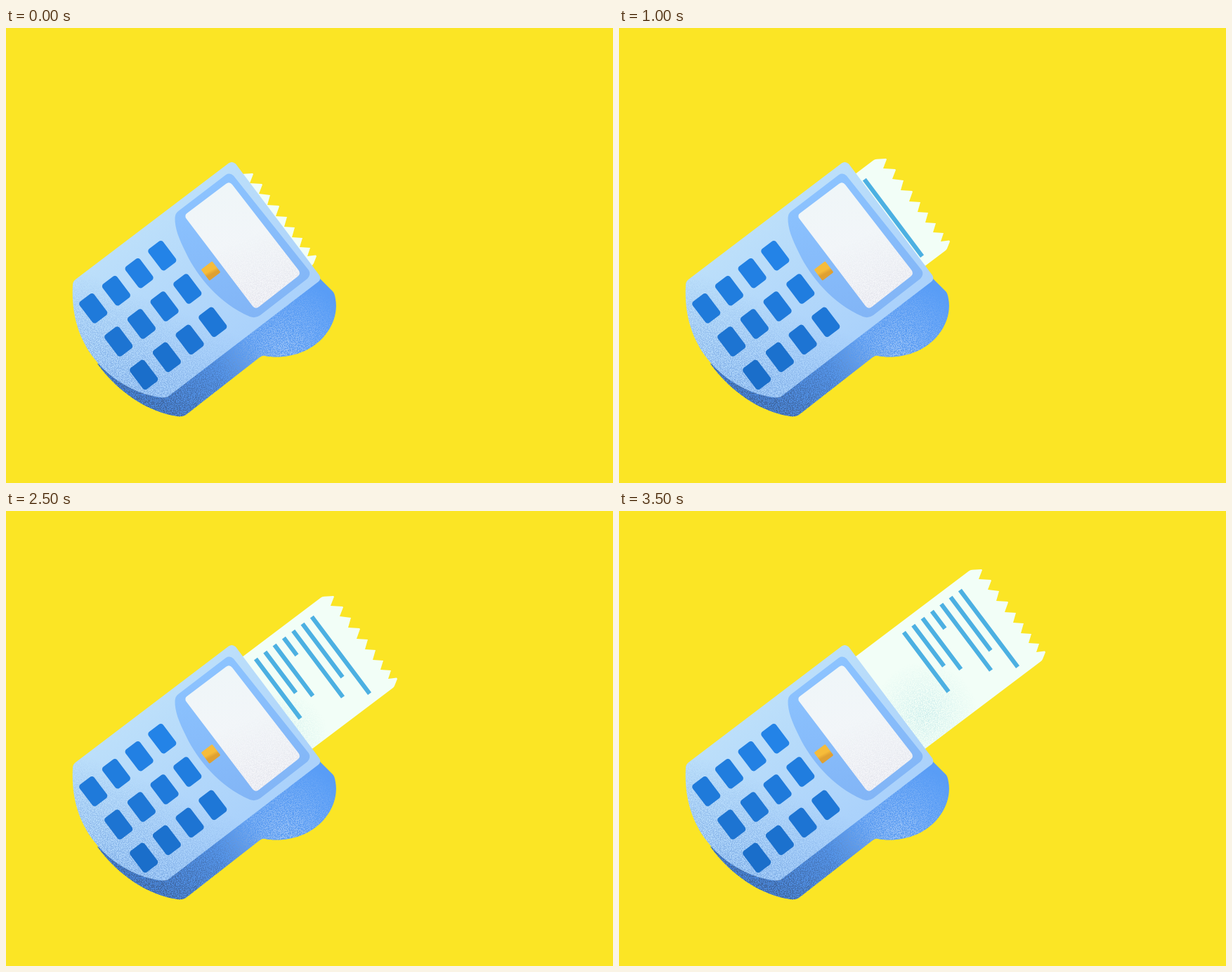
These frames come from a looping animation (864x648 px, 4 s). An HTML page:

```html
<!DOCTYPE html>
<html lang="en">
<head>
<meta charset="utf-8">
<title>Receipt printing</title>
<style>
  html, body { margin: 0; width: 100%; height: 100%; overflow: hidden; background: #fbe525; }
  svg { display: block; width: 864px; height: 648px; }
  #paper { animation: print 4s step-end infinite; }
  @keyframes print {
    0%    { transform: translate(-165px, 124px); }
    12.5% { transform: translate(-157px, 118px); }
    25%   { transform: translate(-136px, 103px); }
    37.5% { transform: translate(-110px, 83.5px); }
    50%   { transform: translate(-82px, 62px); }
    62.5% { transform: translate(-50px, 38px); }
    75%   { transform: translate(-21.5px, 16.5px); }
    87.5%, 100% { transform: translate(0, 0); }
  }
</style>
</head>
<body>
<svg viewBox="0 0 864 648">
  <defs>
    <filter id="grain" x="0" y="0" width="864" height="648" filterUnits="userSpaceOnUse" color-interpolation-filters="sRGB">
      <feTurbulence type="fractalNoise" baseFrequency=".75" numOctaves="2" seed="4"/>
      <feColorMatrix values="0 0 0 0 0  0 0 0 0 0  0 0 0 0 0  5 0 0 0 -2"/>
      <feComposite in="SourceGraphic" operator="in"/>
    </filter>
    <linearGradient id="faceFill" gradientUnits="userSpaceOnUse" x1="210" y1="275" x2="330" y2="440">
      <stop offset="0" stop-color="#bcdffa"/><stop offset="1" stop-color="#abd2fb"/>
    </linearGradient>
    <linearGradient id="sideFill" gradientUnits="userSpaceOnUse" x1="440" y1="380" x2="200" y2="545">
      <stop offset="0" stop-color="#599df6"/><stop offset=".55" stop-color="#5899ee"/><stop offset="1" stop-color="#4b8ae0"/>
    </linearGradient>
    <linearGradient id="frameFill" gradientUnits="userSpaceOnUse" x1="290" y1="220" x2="350" y2="410">
      <stop offset="0" stop-color="#8cc3ff"/><stop offset="1" stop-color="#82b5f6"/>
    </linearGradient>
    <linearGradient id="screenFill" gradientUnits="userSpaceOnUse" x1="315" y1="220" x2="360" y2="400">
      <stop offset="0" stop-color="#eff6f8"/><stop offset="1" stop-color="#f5f5f9"/>
    </linearGradient>
    <linearGradient id="buttonFill" gradientUnits="userSpaceOnUse" x1="293" y1="334" x2="289" y2="359">
      <stop offset=".45" stop-color="#f6bc3a"/><stop offset=".65" stop-color="#dfa031"/>
    </linearGradient>
    <linearGradient id="faceShade" gradientUnits="userSpaceOnUse" x1="215" y1="390" x2="165" y2="510">
      <stop offset="0" stop-color="#6d9fdf" stop-opacity="0"/><stop offset="1" stop-color="#6d9fdf" stop-opacity=".75"/>
    </linearGradient>
    <linearGradient id="sideShade" gradientUnits="userSpaceOnUse" x1="325" y1="430" x2="240" y2="555">
      <stop offset="0" stop-color="#3b5d90" stop-opacity="0"/><stop offset="1" stop-color="#3b5d90" stop-opacity=".85"/>
    </linearGradient>
    <radialGradient id="sideGlow" gradientUnits="userSpaceOnUse" cx="395" cy="455" r="100">
      <stop offset="0" stop-color="#b4d2f8" stop-opacity=".75"/><stop offset="1" stop-color="#b4d2f8" stop-opacity="0"/>
    </radialGradient>
    <linearGradient id="screenShade" gradientUnits="userSpaceOnUse" x1="335" y1="300" x2="375" y2="400">
      <stop offset="0" stop-color="#d5d7e2" stop-opacity="0"/><stop offset="1" stop-color="#d5d7e2" stop-opacity=".55"/>
    </linearGradient>
    <radialGradient id="paperShade" gradientUnits="userSpaceOnUse" cx="435" cy="290" r="75">
      <stop offset="0" stop-color="#b5e4e6" stop-opacity=".6"/><stop offset="1" stop-color="#b5e4e6" stop-opacity="0"/>
    </radialGradient>
    <path id="sheet" d="M310 227.500L498 85.500Q500 84 503 83.700L516 83L517 84L512 97L529 98L530 99L525 112L541 114L537 128L553 129L554 130L549 144L565 145L561 159L576 160L572 174L587 175L583 188L598 189L594 201L606 199.500L607 201L603 211Q602 213 600 214.500L410 358Z"/>
    <path id="side" d="M440 350L465 375Q468 378 469 386C474 412 458 445 425 460C405 469 383 470 369 467Q365 466 361 469L256 551Q252 554 244 553C205 548 160 520 130 478L230 500Z"/>
    <path id="face" d="M317 192.500Q322 189 327 193.500L446 352Q449 357 445 361L233 523Q229 527 221 526C190 523 150 503 125 470C102 440 93 405 95 366Q95 361 99 358Z"/>
    <path id="screen" d="M313 222Q318 218 322 223L416.500 345Q420 350 415 354L360 397Q355 401 351 396L257 272Q253 267 258 263.500Z"/>
  </defs>

  <rect width="864" height="648" fill="#fbe525"/>

  <g id="paper">
    <use href="#sheet" fill="#f2fef7"/>
    <use href="#sheet" fill="url(#paperShade)" filter="url(#grain)"/>
    <g id="lines" transform="matrix(.8 -.6 .6 .8 0 0)" stroke="#4cb0e2" stroke-width="6.200"/>
  </g>

  <use href="#side" fill="url(#sideFill)"/>
  <use href="#side" fill="url(#sideGlow)" filter="url(#grain)"/>
  <use href="#side" fill="url(#sideShade)" filter="url(#grain)"/>
  <use href="#face" fill="url(#faceFill)"/>
  <use href="#face" fill="url(#faceShade)" filter="url(#grain)"/>

  <path fill="url(#frameFill)" d="M313 209Q319 205.500 324 210.500L431 345Q434.500 351 429 357L362 409Q355 414 347 411C303 392 272 353 257 322C246 300 240 285 240.500 270Q241 264 245 261Z"/>
  <use href="#screen" fill="url(#screenFill)"/>
  <use href="#screen" fill="url(#screenShade)" filter="url(#grain)"/>
  <rect x="281.500" y="336" width="20" height="20" rx="1.500" fill="url(#buttonFill)" transform="rotate(-37.200 291.500 346)"/>
  <g id="keys"/>
</svg>
<script>
  const make = (parent, tag, attrs) => {
    const el = document.createElementNS("http://www.w3.org/2000/svg", tag);
    for (const name in attrs) el.setAttribute(name, attrs[name]);
    document.getElementById(parent).append(el);
  };

  // Printed lines, outermost first
  [137, 95, 118, 31, 91, 73, 106].forEach((length, i) => {
    const x = 320.7 - 16.65 * i;
    make("lines", "line", { x1: x, x2: x, y1: 381.3, y2: 381.3 + length });
  });

  // Keys get darker towards the bottom
  const keyColor = y => {
    const k = (y - 324) / 170;
    return `rgb(${35 - 9 * k}, ${131 - 21 * k}, ${231 - 29 * k})`;
  };

  // Keypad: three rows of four
  for (let row = 0; row < 3; row++) {
    for (let col = 0; col < 4; col++) {
      const x = 222.3 - 32.7 * col + 36 * row;
      const y = 324.2 + 25 * col + 47.3 * row;
      make("keys", "rect", {
        x: x - 13, y: y - 19, width: 26, height: 38, rx: 4.5,
        fill: keyColor(y), transform: `rotate(-37.2 ${x} ${y})`
      });
    }
  }
</script>
</body>
</html>
```
